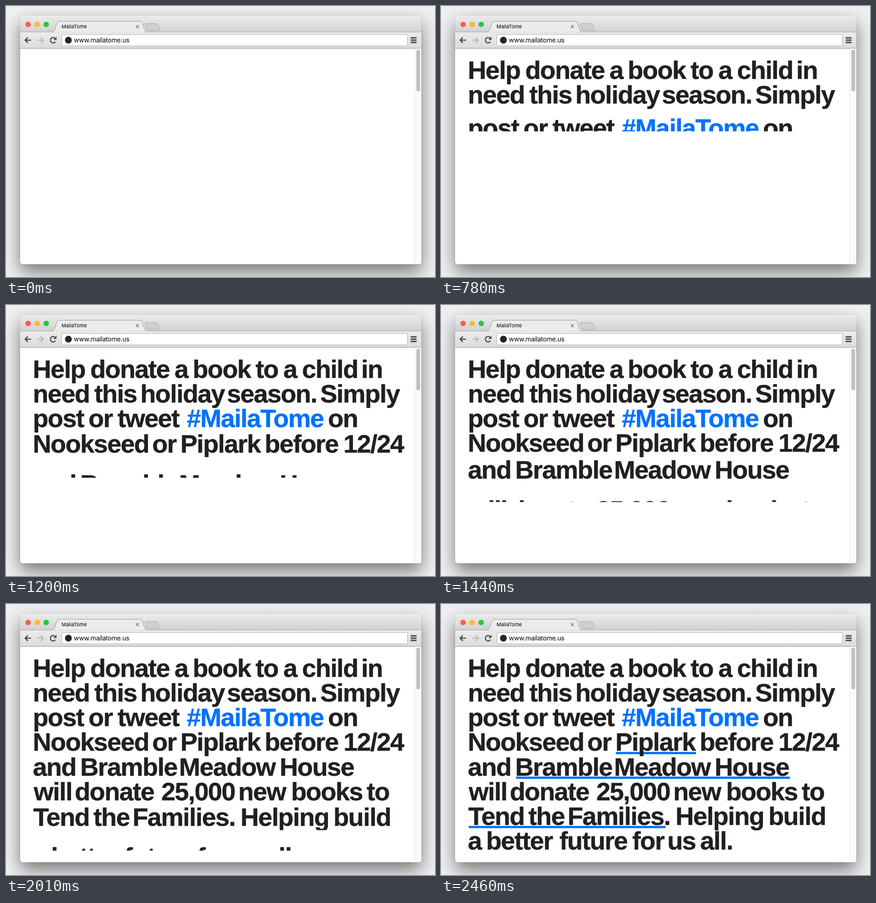
An HTML page for the animation above (7210 ms loop, 942 px wide and 595 px high).

```html
<!DOCTYPE html>
<html lang="en">
<head>
<meta charset="utf-8">
<title>MailaTome</title>
<style>
  html, body { margin: 0; width: 100%; height: 100%; overflow: hidden; background: #f0f0f2; }
  #window {
    position: absolute; left: 31px; top: 22px; width: 881px; height: 545px;
    border-radius: 5px; background: #fff;
    box-shadow: 0 0 1px rgba(0,0,0,.55), 0 17px 38px rgba(0,0,0,.5);
  }
  svg { position: absolute; left: 0; top: 0; }
  .ui { font-family: Inter, Roboto, sans-serif; fill: #000; }
  .headline {
    font: bold 56px "Liberation Sans", Arial, sans-serif;
    letter-spacing: -1.6px; fill: #231f20; stroke: #231f20; stroke-width: .5px;
  }
  .hashtag { fill: #0072ff; stroke: #0072ff; }
</style>
</head>
<body>
<div id="window"></div>
<svg id="stage" width="942" height="595" viewBox="0 0 942 595">
  <defs>
    <linearGradient id="strip" x2="0" y2="1">
      <stop stop-color="#ebebeb"/><stop offset="1" stop-color="#d2d2d2"/>
    </linearGradient>
    <linearGradient id="bar" x2="0" y2="1">
      <stop stop-color="#ececec"/><stop offset="1" stop-color="#dcdcdc"/>
    </linearGradient>
  </defs>

  <!-- Title strip and tabs -->
  <path d="M31 57V27q0-5 5-5H907q5 0 5 5V57z" fill="url(#strip)"/>
  <path d="M35 22.5H908" stroke="#f6f6f6"/>
  <rect x="31" y="57" width="881" height="36" fill="url(#bar)"/>
  <path d="M31 57H912" stroke="#a0a0a0"/>
  <path d="M101 57.5q4-.5 5.500-4.500L112 37q1.300-3.500 5-3.500H294q3.700 0 5 3.500L304.500 53q1.500 4 5.500 4.500z" fill="#ececec"/>
  <path d="M101 57q4-.5 5.500-4L112 37q1.300-3.500 5-3.500H294q3.700 0 5 3.500L304.500 53q1.500 3.500 5.500 4" fill="none" stroke="#999"/>
  <path d="M308 38.500H329q3 0 4 2.500L337 51q.8 2.500-2 2.500H314q-3 0-4-2.500L306 41q-.8-2.500 2-2.500z" fill="#d0d0d0" stroke="#a8a8a8"/>
  <circle cx="48.500" cy="40.500" r="6" fill="#fc5b52"/>
  <circle cx="68.500" cy="40.500" r="6" fill="#fdb92e"/>
  <circle cx="88.300" cy="40.500" r="6" fill="#2ac53e"/>
  <text class="ui" x="122" y="49" font-size="11">MailaTome</text>
  <path d="M285.500 42l6 6.500m0-6.500l-6 6.500" stroke="#757575" stroke-width="1.500"/>

  <!-- Toolbar -->
  <path d="M55 75H42.500M48 69l-6 6 6 6" fill="none" stroke="#4c4c4c" stroke-width="2.600"/>
  <path d="M69 75H81.500M76 69l6 6-6 6" fill="none" stroke="#bbb" stroke-width="2.600"/>
  <path d="M108.500 78.500A6 6 0 1 1 107.500 70.700" fill="none" stroke="#4c4c4c" stroke-width="2.500"/>
  <path d="M111 67.500V74.500H104z" fill="#4c4c4c"/>
  <rect x="122.500" y="62.500" width="759" height="25" rx="2" fill="#fff" stroke="#adadad"/>
  <circle cx="137" cy="75" r="7.500" fill="#262324"/>
  <text class="ui" x="149" y="80" font-size="14" letter-spacing="-.2">www.mailatome.us</text>
  <path d="M888.500 70H901.500M888.500 75H901.500M888.500 80H901.500" stroke="#464646" stroke-width="2.800"/>
  <path d="M31 93H912" stroke="#858585"/>

  <!-- Scrollbar -->
  <path d="M898 93.500H912V562q0 5-5 5H898z" fill="#fafafa"/>
  <path d="M897.500 94V567" stroke="#e6e6e6"/>
  <rect x="901" y="96" width="8.500" height="91.500" rx="4.200" fill="#c1c1c1"/>
</svg>
<script>
const LOOP = 7210, STEP = 30;
const STAGGER = 270, RISE_TIME = 450, RISE = 42;
const RULE_START = 2160, RULE_TIME = 300;
const FIRST_BASELINE = 160, LEADING = 54.15;

// Each line of copy with the x position of its words.
const copy = [
  ['Help donate a book to a child in', [59, 185, 370, 410, 548, 609, 650, 780]],
  ['need this holiday season. Simply', [59, 194, 295, 485, 690]],
  ['post or tweet #MailaTome on', [59, 181, 245, 397, 707]],
  ['Nookseed or Piplark before 12/24', [59, 321, 383, 568, 741]],
  ['and Bramble Meadow House', [59, 163, 380, 601]],
  ['will donate 25,000 new books to', [61, 151, 341, 510, 626, 792]],
  ['Tend the Families. Helping build', [60, 192, 278, 515, 719]],
  ['a better future for us all.', [59, 99, 260, 420, 497, 569]],
];
// Underlines: line index, left, right.
const underlines = [[3, 384, 560], [4, 165, 766], [6, 61, 493]];

const stage = document.getElementById('stage');
const add = (parent, tag, attributes = {}) => {
  const node = document.createElementNS('http://www.w3.org/2000/svg', tag);
  for (const name in attributes) node.setAttribute(name, attributes[name]);
  return parent.appendChild(node);
};
const baselineOf = index => FIRST_BASELINE + index * LEADING;
const ease = u => (1 - Math.cos(Math.PI * Math.min(1, Math.max(0, u)))) / 2;

const rules = underlines.map(([index, left, right]) => ({
  node: add(stage, 'rect', { x: left, y: baselineOf(index) + 2.3, height: 5, width: 0, fill: '#0072ff' }),
  width: right - left,
}));

const lines = copy.map(([words, positions], index) => {
  const baseline = baselineOf(index);
  const clip = add(stage, 'clipPath', { id: 'clip' + index });
  const mask = add(clip, 'rect', { x: 31, y: baseline - 50, width: 866, height: 0 });
  const group = add(stage, 'g', { 'clip-path': `url(#clip${index})` });
  const text = add(group, 'text', { class: 'headline' });
  words.split(' ').forEach((word, i) => {
    const span = add(text, 'tspan', { x: positions[i] });
    span.textContent = word;
    if (word[0] === '#') span.setAttribute('class', 'hashtag');
  });
  return { text, mask, baseline };
});

function draw(t) {
  lines.forEach(({ text, mask, baseline }, index) => {
    const age = t - index * STAGGER;
    const drop = RISE * (1 - ease(age / RISE_TIME));
    text.setAttribute('y', baseline + drop);
    mask.setAttribute('height', age < 60 ? 0 : 62 - 0.27 * drop);
  });
  const grown = ease((t - RULE_START) / RULE_TIME);
  rules.forEach(({ node, width }) => node.setAttribute('width', width * grown));
}

const start = performance.now();
function tick() {
  const t = (performance.now() - start) % LOOP;
  draw(Math.floor(t / STEP) * STEP);
  requestAnimationFrame(tick);
}
tick();
</script>
</body>
</html>
```
